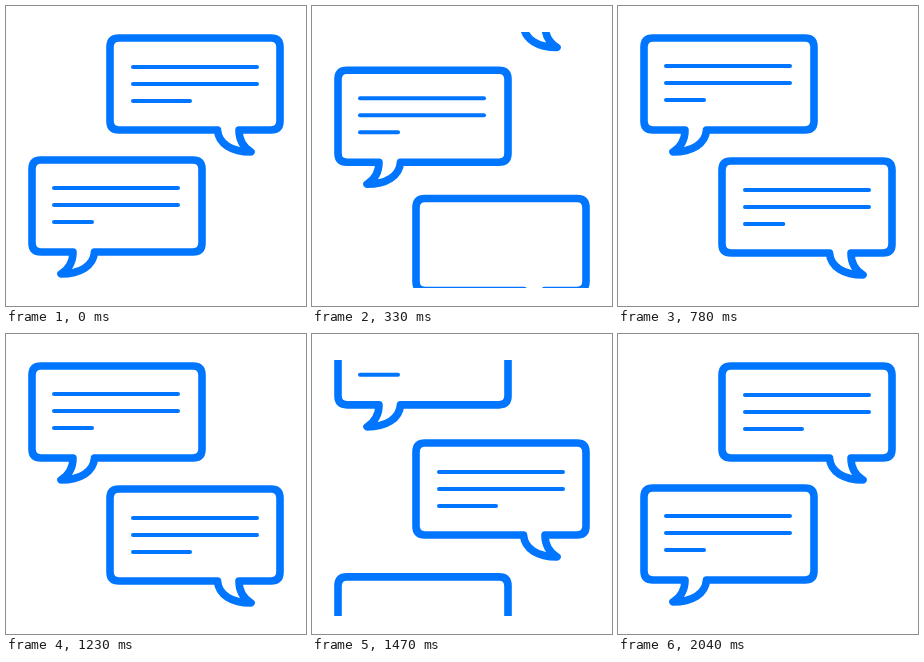
Animation of 300 by 300 pixels, one loop 2.43 s. Source, as an HTML page:

```html
<!DOCTYPE html>
<html lang="en">
<head>
<meta charset="utf-8">
<title>Chat bubbles</title>
<style>
  html, body { margin: 0; width: 100%; height: 100%; overflow: hidden; background: #fff; }
  svg { display: block; width: 100%; height: 100%; }
  g { fill: none; stroke: #0075ff; stroke-linecap: round; stroke-linejoin: round; }
  .shell { stroke-width: 7.6; }
  .line { stroke-width: 4; }
</style>
</head>
<body>
<svg viewBox="0 0 300 300">
  <clipPath id="window"><rect x="0" y="26" width="300" height="256"/></clipPath>
  <g id="stage" clip-path="url(#window)"></g>
</svg>
<script>
const LOOP = 2430, SLIDE = 540, WRITE = 265;
const STARTS = [5, 1228];
const EXIT = 142;

// Both bubbles rest at the top with y = 0; low is the lower resting place.
const SIDES = {
  right: { low: 123, x: 127, y: 61, ends: [251, 251, 184], flip: '' },
  left: { low: 122, x: 48, y: 60, ends: [172, 172, 86], flip: 'translate(300 0) scale(-1 1)' }
};
const SHELL = 'M211.5 124H113Q104 124 104 115V41Q104 32 113 32H265Q274 32 274 41' +
  'V115Q274 124 265 124H233C233 133 237 141 245 146C226 146 212.5 138 211.5 124';

const stage = document.getElementById('stage');
const clamp = v => Math.min(1, Math.max(0, v));
const mix = (a, b, p) => a + (b - a) * p;

function add(parent, tag, attrs) {
  const el = document.createElementNS('http://www.w3.org/2000/svg', tag);
  for (const key in attrs) el.setAttribute(key, attrs[key]);
  return parent.appendChild(el);
}

function makeBubble(name) {
  const side = SIDES[name];
  const group = add(stage, 'g', {});
  add(group, 'path', { class: 'shell', d: SHELL, transform: side.flip });
  const lines = side.ends.map((end, i) => {
    const y = side.y + 17 * i;
    return add(group, 'line', { class: 'line', x1: side.x, x2: end, y1: y, y2: y });
  });
  return { side, group, lines };
}

function place(bubble, y, written) {
  bubble.group.setAttribute('transform', `translate(0 ${y.toFixed(3)})`);
  bubble.lines.forEach((line, i) => {
    const p = clamp(written * 3 - i);
    line.setAttribute('x2', mix(bubble.side.x, bubble.side.ends[i], p));
    line.style.visibility = p > 0 ? 'visible' : 'hidden';
  });
}

function ease(u) {
  return u < 0.5 ? 0.5 * (2 * u) ** 2.75 : 1 - 0.5 * (2 - 2 * u) ** 2.75;
}

const pairs = {
  right: [makeBubble('right'), makeBubble('right')],
  left: [makeBubble('left'), makeBubble('left')]
};

function draw(t) {
  const second = t >= STARTS[1];
  const since = t - STARTS[second ? 1 : 0];
  const p = ease(clamp(since / SLIDE));
  const written = clamp((since - SLIDE) / WRITE);
  const [leaver, mover] = second ? ['left', 'right'] : ['right', 'left'];
  const low = SIDES[leaver].low;

  place(pairs[leaver][0], mix(0, -EXIT, p), 1);
  place(pairs[leaver][1], mix(low + EXIT, low, p), written);
  place(pairs[mover][0], mix(SIDES[mover].low, 0, p), 1);
  place(pairs[mover][1], -2 * EXIT, 1);
}

const begin = performance.now();
function tick() {
  draw((performance.now() - begin) % LOOP);
  requestAnimationFrame(tick);
}
tick();
</script>
</body>
</html>
```
